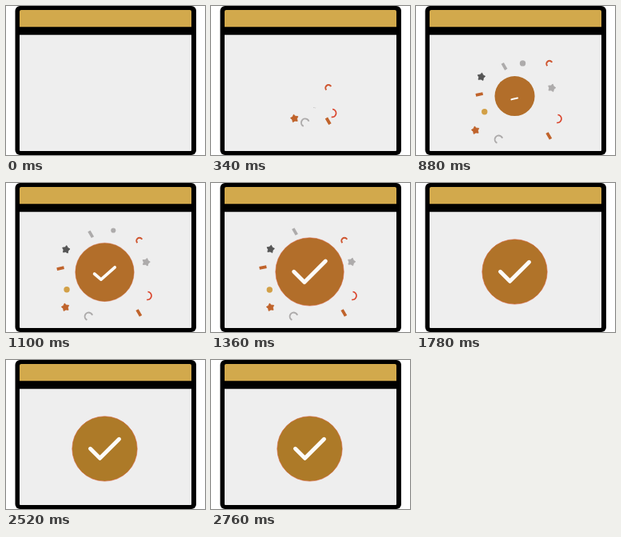
Recreate the animation shown at these times as an HTML page with a canvas. Size 249x187 px, loop 3600 ms.

```html
<!DOCTYPE html>
<html lang="en">
<head>
<meta charset="utf-8">
<title>Success</title>
<style>
html, body { margin: 0; width: 100%; height: 100%; overflow: hidden; background: #fff; }
canvas { display: block; width: 249px; height: 187px; }
</style>
</head>
<body>
<canvas width="249" height="187"></canvas>
<script>
const canvas = document.querySelector('canvas');
const ctx = canvas.getContext('2d');
const ratio = window.devicePixelRatio || 1;
canvas.width = 249 * ratio;
canvas.height = 187 * ratio;

const LOOP = 3600;
const ORIGIN = [130, 128.5];
const rad = deg => deg * Math.PI / 180;
const mix = (a, b, k) => a + (b - a) * k;
const span = (t, from, to) => Math.min(1, Math.max(0, (t - from) / (to - from)));
const easeOut = k => 1 - (1 - k) ** 2;
const smooth = k => k * k * (3 - 2 * k);

// keys: [time, value] pairs in order
function track(t, keys) {
  for (let i = 1; i < keys.length; i++) {
    const [t0, a] = keys[i - 1], [t1, b] = keys[i];
    if (t <= t1) return mix(a, b, span(t, t0, t1));
  }
  return keys[keys.length - 1][1];
}

function box(x, y, w, h, r, color) {
  ctx.fillStyle = color;
  ctx.beginPath();
  ctx.roundRect(x, y, w, h, r);
  ctx.fill();
}

function disc(r) {
  ctx.beginPath();
  ctx.arc(0, 0, r, 0, 7);
  ctx.fill();
}

function star() {
  ctx.beginPath();
  for (let i = 0; i < 10; i++) {
    const r = i % 2 ? 3.1 : 5, a = rad(i * 36 - 90);
    ctx.lineTo(r * Math.cos(a), r * Math.sin(a));
  }
  ctx.closePath();
  ctx.fill();
  ctx.lineWidth = 0.8;
  ctx.lineJoin = 'round';
  ctx.stroke();
}

const dot = () => disc(3.7);
const bar = () => ctx.fillRect(-4.5, -1.9, 9, 3.8);
const arc = (r, sweep, width) => () => {
  ctx.lineWidth = width;
  ctx.beginPath();
  ctx.arc(0, 0, r, 0, rad(sweep));
  ctx.stroke();
};

// flight windows in ms
const EARLY = [140, 900], MID = [333, 1189], LATE = [411, 1295];
const ORANGE = '#c0632b', GRAY = '#adabab', RED = '#da472f';
// shape, color, end x, end y, angle, flight
const confetti = [
  [star, ORANGE, 74.3, 156, -12, EARLY],
  [arc(4.9, 225, 2), GRAY, 103.5, 167.5, 115, EARLY],
  [bar, ORANGE, 166.3, 163, 60, EARLY],
  [arc(5, 185, 1.7), RED, 177, 141.5, -85, EARLY],
  [arc(3.7, 195, 2), '#cf5630', 167, 72.5, 135, EARLY],
  [star, '#555', 74.5, 83, 10, MID],
  [star, GRAY, 175.8, 99, 15, MID],
  [bar, ORANGE, 65, 106, -12, LATE],
  [dot, '#d2a047', 73.3, 134, 0, LATE],
  [bar, GRAY, 105, 61, 60, LATE],
  [dot, GRAY, 134.5, 56, 0, LATE, 1060, 1300]
];

function drawPiece(t, [shape, color, x, y, angle, flight, out = 1380, gone = 1610]) {
  const k = easeOut(span(t, ...flight));
  const size = Math.min(1, k * 4) * (1 - span(t, out, gone));
  if (size <= 0) return;
  ctx.save();
  ctx.translate(mix(ORIGIN[0], x, k), mix(ORIGIN[1], y, k));
  ctx.rotate(rad(angle));
  ctx.scale(size, size);
  ctx.fillStyle = ctx.strokeStyle = color;
  shape();
  ctx.restore();
}

function drawBadge(t) {
  const r = track(t, [[410, 0], [560, 8], [880, 25], [1200, 42], [1360, 42.7], [1640, 40.7]]);
  if (r <= 0) return;
  const move = easeOut(span(t, 560, 900));
  const settle = span(t, 880, 1200);
  const tint = span(t, 1500, 2220);
  ctx.save();
  ctx.translate(mix(ORIGIN[0], 123.5, move), mix(ORIGIN[1], 113, move) - 1.6 * settle);
  ctx.fillStyle = `rgb(${mix(178, 173, tint)},${mix(110, 122, tint)},${mix(42, 40, tint)})`;
  disc(r);
  ctx.strokeStyle = '#d9603c';
  ctx.lineWidth = 0.6 * settle;
  if (settle) ctx.stroke();
  ctx.restore();
}

function drawCheck(t) {
  if (t < 820) return;
  const k = smooth(span(t, 880, 1280));
  const size = track(t, [[820, 0], [880, 1], [1240, 1.1], [1360, 1.1], [1640, 1]]);
  const from = [[-4, 6], [-2, 5.5], [3.5, 4.2]];
  const to = [[-18, 0], [-6, 12], [18, -12]];
  ctx.strokeStyle = '#fcfbf8';
  ctx.lineWidth = mix(2.2, 5, k) * Math.min(1, size);
  ctx.lineCap = ctx.lineJoin = 'round';
  ctx.beginPath();
  from.forEach(([x, y], i) =>
    ctx.lineTo(123.5 + mix(x, to[i][0], k) * size, 111.3 + mix(y, to[i][1], k) * size));
  ctx.stroke();
  ctx.lineCap = 'butt';
}

function draw(now) {
  const t = now % LOOP;
  ctx.setTransform(ratio, 0, 0, ratio, 0, 0);
  ctx.fillStyle = '#fff';
  ctx.fillRect(0, 0, 249, 187);
  box(11.5, 0, 226.5, 187, 6, '#000');
  box(17, 5, 215, 21.3, [2, 2, 0, 0], '#d2a94c');
  box(17, 36.3, 215, 145.7, [0, 0, 1, 1], '#eee');
  confetti.forEach(piece => drawPiece(t, piece));
  drawBadge(t);
  drawCheck(t);
}

const start = performance.now();
function tick() {
  draw(performance.now() - start);
  requestAnimationFrame(tick);
}
tick();
</script>
</body>
</html>
```
